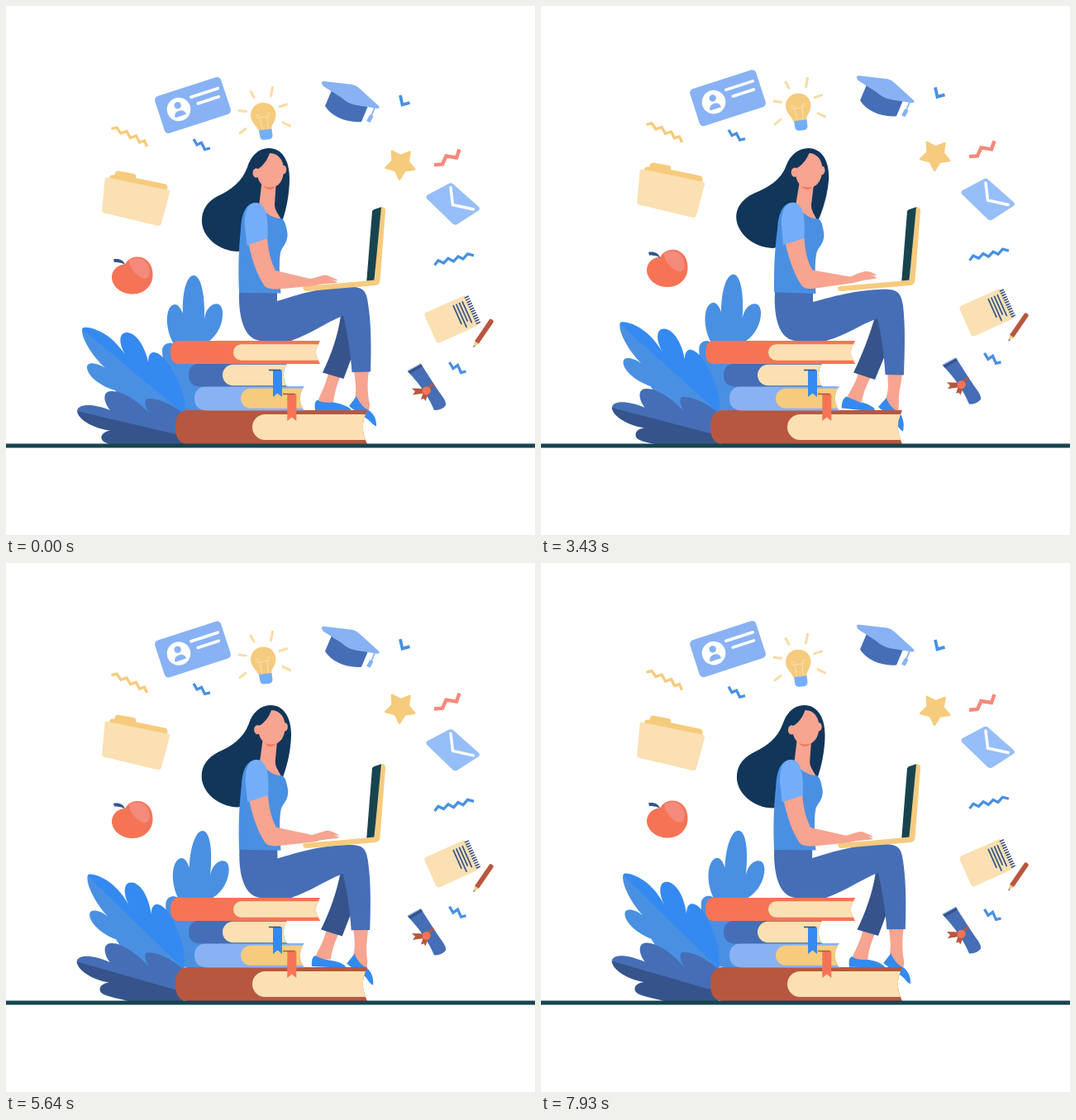
An HTML page with a canvas for the animation above (8 s loop, 640 by 640 pixels).

```html
<!DOCTYPE html>
<html lang="en">
<head>
<meta charset="utf-8">
<title>Learning online</title>
<style>
html, body { margin: 0; width: 100%; height: 100%; overflow: hidden; background: #fff; }
canvas { display: block; width: 100vw; height: 100vh; object-fit: contain; }
</style>
</head>
<body>
<canvas id="stage" width="640" height="640"></canvas>
<script>
const ctx = document.getElementById('stage').getContext('2d');
const LOOP = 8000;
const SWING = 7180;

const C = {
  blue: '#4a90e2', bright: '#348af0', denim: '#466eb6', navy: '#36548b',
  sky: '#88b2f4', sleeve: '#74aefa', mail: '#96bef8', hair: '#12365a',
  skin: '#f7a491', red: '#f67456', pink: '#f48a7c', brick: '#b8573f',
  gold: '#f6cb7d', cream: '#fae0b2', teal: '#17444f', white: '#fff'
};

const cache = new Map();
function path(d) {
  if (!cache.has(d)) cache.set(d, new Path2D(d));
  return cache.get(d);
}

function fill(color, d) {
  ctx.fillStyle = color;
  ctx.fill(typeof d === 'string' ? path(d) : d);
}

function line(color, width, d, cap = 'butt') {
  ctx.strokeStyle = color;
  ctx.lineWidth = width;
  ctx.lineCap = cap;
  ctx.lineJoin = 'miter';
  ctx.stroke(path(d));
}

function oval(color, x, y, rx, ry = rx) {
  ctx.fillStyle = color;
  ctx.beginPath();
  ctx.ellipse(x, y, rx, ry, 0, 0, Math.PI * 2);
  ctx.fill();
}

function box(color, x, y, w, h, r) {
  ctx.fillStyle = color;
  ctx.beginPath();
  ctx.roundRect(x, y, w, h, r);
  ctx.fill();
}

function turned(x, y, angle, draw) {
  ctx.save();
  ctx.translate(x, y);
  ctx.rotate(angle);
  draw();
  ctx.restore();
}

function pivot(x, y, angle, draw) {
  turned(x, y, angle, () => { ctx.translate(-x, -y); draw(); });
}

// Blend two path strings of the same structure.
function morph([a, b], k) {
  const to = b.match(/-?[\d.]+/g);
  let i = 0;
  return new Path2D(a.replace(/-?[\d.]+/g, n => +n + (to[i++] - n) * k));
}

/* ---------- floating things ---------- */

function card() {
  turned(226, 120, -Math.PI / 10, () => {
    box(C.sky, -42, -23.5, 84, 47, 5);
    oval(C.white, -17.7, -0.5, 14.3);
    oval(C.sky, -17.5, -5.5, 4.2);
    fill(C.sky, 'M-25 7.5C-25 -1 -11 -1 -11 7.5Q-11 8 -12 8H-24Q-25 8 -25 7.5Z');
    line(C.white, 3.6, 'M1 -10H35M6.5 0H33', 'round');
  });
}

function bulb() {
  line('#f9dca4', 3, 'M296 103.5L300 110.5M322.5 98.5L320.5 109M331 121.8L339.5 119M335 141L343.5 145M290 148.5L283 154M282 126.5L290.5 127.5', 'round');
  fill(C.gold, 'M311 117C302 117 296 124 296 132C296 141 303 144 305.5 151L321 149C321 143 326.5 140 326.5 131C326 123 320 117 311 117Z');
  fill(C.sleeve, 'M306 150.5L321.5 148.5L322.5 157Q322 161 318 161.3L312 162Q308.5 162 307.5 159Z');
  line(C.cream, 1, 'M310 149.5L307 136Q302 136 303 132Q306 130 307.5 135L316 134Q315 129 318.5 129Q321 132 316 134L317 148.5');
}

function cap() {
  fill(C.denim, 'M394 102L386 121C394 134 412 141.5 430 140L438 121L424 118L406 110Z');
  line(C.white, 3.5, 'M442.5 122.5L435.5 139');
  fill(C.sky, 'M384.5 91L419 95Q424 96 428 100L451 121Q453 124 449 124L424 120Q413 118 406 111L384 97Q379.5 91.5 384.5 91Z');
  line(C.sky, 1.8, 'M446 123L442 133');
  fill(C.sky, 'M440.5 131L444.5 133.5L440.5 141L436 139Z');
}

function star() {
  ctx.beginPath();
  for (let i = 0; i < 10; i++) {
    const a = 1.62 + i * Math.PI / 5, r = i % 2 ? 10 : 18.5;
    ctx.lineTo(477 + r * Math.cos(a), 191 + r * Math.sin(a));
  }
  ctx.closePath();
  ctx.fillStyle = ctx.strokeStyle = C.gold;
  ctx.lineWidth = 2.5;
  ctx.lineJoin = 'round';
  ctx.fill();
  ctx.stroke();
}

function envelope() {
  fill(C.mail, 'M510 228.5L535.5 215Q538.5 213.5 541 215.5L571.5 242.5Q574.5 245.5 571.5 247.5L546 264Q543 265.5 540.5 263.5L509.5 233.5Q507 230.5 510 228.5Z');
  line(C.white, 3.4, 'M538 219.5L540.5 240.5L565.5 246', 'round');
}

function notebook() {
  turned(539, 379, -0.42, () => {
    box(C.cream, -28, -20, 56, 40, 4);
    line(C.navy, 1.7, 'M8.7 -14.5V10.5M12.7 -14.5V16.5M16.7 -14.5V10.5M20.7 -14.5V14');
    for (let i = 0; i < 12; i++) line(C.navy, 1.6, `M25 ${-17 + i * 3.1}h5.5`);
  });
}

function pencil() {
  turned(565.3, 413, -0.97, () => {
    fill(C.gold, 'M0 0L8 -2.9V2.9Z');
    fill(C.navy, 'M0 0L2.5 -.9V.9Z');
    box(C.brick, 7.5, -2.9, 33, 5.8, [0, 2, 2, 0]);
  });
}

function diploma() {
  fill(C.denim, 'M486 442L502 433C512 448 519 460 527 471Q533 479 532 483Q528 489 518 489C511 472 501 458 486 442Z');
  fill(C.navy, 'M486 442L502 433L504 436L489 445Z');
  line(C.sky, 1.2, 'M486 441.5L502 432.8');
  line(C.brick, 3, 'M509 464L517 456.5');
  fill(C.brick, 'M506 463L491 462.5L495 466.5L492 470.5L506 468.5ZM505 467L502 476L505.5 475L507.5 478L511 468Z');
  oval(C.red, 508.7, 465.5, 5);
}

function apple() {
  fill(C.red, 'M146 313C136 311 127 320 128 330C130 342 142 349 154 348.5C168 348 178 338 177.5 324C177 310 168 303 158 303.5C151 304 146 308 144 313Z');
  fill(C.pink, 'M149 308C156 303 166 304 171 312C176 321 173 330 168 330C160 329 149 318 149 308Z');
  fill(C.navy, 'M130 306.5C136 305 142 307 144.5 313.5C139 309.5 134 310.5 131 310Z');
}

function folder() {
  fill(C.gold, 'M124 211L125.5 206Q126 204 131 204.5L132 202Q133 199 136 199.5L155 203Q158 204 157 208L193 215.5Q196.5 217 195 223Z');
  fill(C.cream, 'M122.5 207.5L195.5 222.5Q198.5 223 198 226L188 263Q187 266.5 183 265.8L119 250.5Q116 250 116.3 246L119.5 210Q120 207 122.5 207.5Z');
}

const zig = (color, width, d) => () => line(color, width, d);

// Each entry: time of the highest point, drawing.
const floaters = [
  [6900, card],
  [5850, bulb],
  [7450, cap],
  [6200, star],
  [7750, envelope],
  [7100, notebook],
  [7300, pencil],
  [7350, diploma],
  [6950, apple],
  [6500, folder],
  [7850, zig(C.gold, 3.3, 'M127.5 148.5L134 147L139 154L146 151.5L150.5 159.5L157.5 157L161.5 165L167.5 163L170.5 170')],
  [5700, zig(C.blue, 3.3, 'M227 161L231 168L236.5 165.5L240.5 173.5L247 172')],
  [6600, zig(C.blue, 3.8, 'M477 108L479.5 119.5L488.5 117')],
  [6400, zig(C.pink, 4.4, 'M518 192.3L528 191.5L532.5 181.5L545 183.5L548.5 173.5')],
  [7700, zig(C.blue, 3.3, 'M518.5 313.5L523 307.8L529.5 311L535 305.3L541.5 309L547 303L553 306L558.5 299.8L566 301.8')],
  [5850, zig(C.blue, 3.3, 'M536.5 431L541 438.5L546.5 434.5L550.5 443.5L556.5 442')]
];

function rise(t, peak) {
  const wave = x => Math.cos(Math.PI * x / SWING);
  return -8.4 * (wave(t - peak) - wave(peak));
}

/* ---------- plants and books ---------- */

function plants(k) {
  ctx.save();
  ctx.beginPath();
  ctx.rect(0, 0, 640, 530);
  ctx.clip();
  pivot(260, 472, 0.085 * k, () => {
    fill(C.blue, 'M227 326C219 326 213 345 214 372C211 364 207 361 204 361C197 362 194 372 195 384C196 394 199 402 203 409C198 406 190 408 189 416C189 440 205 470 216 492H250L255 415L245 406C256 398 263 384 262 370C261 361 256 359 251 361C244 364 241 371 240 379C241 350 236 326 227 326Z');
    fill(C.blue, 'M92 391C91 402 104 423 120 438C110 431 98 430 98 437C98 447 114 460 132 465L160 500H217V485L100 391Z');
    fill(C.bright, 'M92 391C93 386 108 390 118 396C130 403 138 413 145 423C136 409 136 395 146 395C157 395 170 412 174 440C170 426 173 418 180 419C190 421 199 435 208 453C214 466 217 478 217 495Z');
  });
  pivot(255, 478, 0.052 * k, () => {
    fill(C.navy, 'M86 490C87 500 105 511 126 513.5C117 515 113 521 117 526C122 531 138 532 155 536V540H217V515L100 487Z');
    fill(C.denim, 'M86 490C87 481 105 481 126 489C117 478 117 466 127 466C140 465 160 478 174 493C168 485 166 475 172 475C186 474 206 485 219 496V521L205 518Z');
  });
  ctx.restore();
}

function book(cover, pages, left, right, top, bottom, pageLeft, edge, r) {
  const mid = (top + bottom) / 2, y1 = top + edge, y2 = bottom - edge;
  const end = `L${right - 2} ${y1}Q${right - 8.5} ${mid} ${right - 2} ${y2}`;
  const half = (y2 - y1) / 2;
  fill(cover, `M${left + r} ${top}H${right}${end}L${right} ${bottom}H${left + r}Q${left} ${bottom - 1} ${left} ${mid}Q${left} ${top + 1} ${left + r} ${top}Z`);
  fill(pages, `M${pageLeft + half} ${y1}H${right - 2}${end}H${pageLeft + half}A${half} ${half} 0 0 1 ${pageLeft + half} ${y1}Z`);
}

function ribbon(color, bar, x, y, barColor) {
  fill(color, `M${x} ${y}h9.5q1.5 0 1.5 2v31l-5.5 -4.5l-5.5 4.5Z`);
  line(barColor, 1.6, `M${bar} ${y + 0.5}H${x + 9}`);
}

function books() {
  book(C.brick, C.cream, 205, 437, 489, 530, 298, 5, 14);
  book(C.sky, C.gold, 228, 361, 460, 489.5, 284, 2.8, 15);
  book(C.denim, C.cream, 221, 341, 432.5, 460.5, 262, 1.2, 13);
  book(C.red, C.cream, 199, 380, 405, 433, 275, 4.2, 9);
  ribbon(C.bright, 318, 323, 440, C.navy);
  ribbon(C.red, 335, 340.3, 469, C.brick);
}

/* ---------- the student ---------- */

// Pairs of poses: resting, leaning.
const pose = {
  backAnkle: [
    'M390 443L405 447C398 464 397 472 396 480L378 481C375 477 387 462 390 443Z',
    'M384 443L400 447C391 464 390 470 388 479L371 478C366 474 380 462 384 443Z'],
  backShoe: [
    'M376.5 476.5C372 480 374 486 374 489L418 489.5C416 485 406 481 396 479.5C388 480 381 480 376.5 476.5Z',
    'M369 472.5C364 476 364 482 363.5 486.5L401 490.5C405 490 404 487 401 485C395 481 390 480 385 479C377 478 372 476 369 472.5Z'],
  frontAnkle: [
    'M421 441L439 441C437 455 437 468 440 482L439 494C432 490 424 480 422.5 473C424 465 423 455 421 441Z',
    'M419 444L437 444C436 458 432 468 433 480L432 494C425 488 418 480 417 475C421 465 420 455 419 444Z'],
  frontShoe: [
    'M424 472L415 484C424 492 434 496 441 503C444 507 447 508 448 508.5C448.5 500 445 494 440 490C432 486 427 479 424 472Z',
    'M418 474L408 485C415 492 424 494 428 500C431 508 434 513 438 514.5C440 506 438 497 433 491C426 488 420 482 418 474Z'],
  backLeg: [
    'M405 374C402 397 394 421 383 443.5L408.5 451L420 420L412 374Z',
    'M404 376C397 400 389 421 378 443.5L404 452L418 418L412 376Z'],
  frontLeg: [
    'M282 346L328 346L328 357C345 352 375 341 410 340C430 339 436 342 438 360C442 385 442 415 441 442.5L418.5 443C417 420 413 395 408 374.5C385 384 370 396 345 405L308 405C292 404 281 385 282 346Z',
    'M283 346L329 346L329 358C346 354 375 344 410 343C430 342 435 345 438 362C441 390 440 415 439 446.5L416.5 446C415 420 412 400 407 378C385 386 370 398 345 405L308 405C292 404 281 385 283 346Z'],
  hair: [
    'M318 172C334 172 343 187 343 208C343 228 339 246 335 258L300 290L281 297C257 297 236 278 237 259C237 247 243 237 256 230C272 223 286 212 292 195C296 182 305 172 318 172Z',
    'M323.8 172C339.8 172.5 348.5 187 348.3 208C347 228 341 247 336 258L300 290L280 293C256 292 236 274 236.2 254.5C236.5 243 244 233 258 226.5C274 220 290 211 296.5 193.5C301 181 311 172 323.8 172Z'],
  arm: [
    'M293 286L316 280C317 297 321 310 326 320L368 330C375 329 381 326 386 325.5C391 326 398 330 401 331.5C401 333 396 331.5 390 330.5C394 331 400 333 401 334.5C398 336 385 335 372 338.5L330 342.5C320 343 314 342 311 336C302 322 297 304 293 286Z',
    'M295.5 286L318.5 280C319.5 296 322.5 310 328.5 319.5L374 327.5C381 325 388 321 394 321C399 321 403 324 406 325.5C406 327 400 326 396 325C400 326 405 327 406 329C402 331 390 331 378 335L332 341.5C323 343 317 342 314 336C304.5 321 299.5 304 295.5 286Z']
};

function feet(k) {
  fill(C.skin, morph(pose.backAnkle, k));
  fill(C.bright, morph(pose.backShoe, k));
  fill(C.skin, morph(pose.frontAnkle, k));
  fill(C.bright, morph(pose.frontShoe, k));
}

function laptop() {
  fill(C.gold, 'M451 246L453 243.5Q459.5 242 459 249L452.5 332Q452 337.3 447 338L364 345Q359.5 345 359 340.5Q360 339.3 363 339L437 332.5L446 331Z');
  fill(C.teal, 'M443 248.5Q443.5 247 445 246.3L454 243.2L445.5 331.5L436.3 332.5Z');
}

function student(k) {
  const lean = draw => pivot(310, 350, 0.025 * k, draw);
  const nod = draw => pivot(320, 276, 0.056 * k, draw);

  fill(C.navy, morph(pose.backLeg, k));
  fill(C.denim, morph(pose.frontLeg, k));

  fill(C.hair, morph(pose.hair, k));
  nod(() => fill(C.skin, 'M310 208L306 243L318 262L334 260C329 251 325 247 325 240L327 210Z'));
  lean(() => fill(C.blue, 'M302 238C290 239 285 250 284 270C281 300 281 320 282 347L332.5 347.5C331 330 330 310 332 299C334 290 341 288 340.5 275C339 266 337 258 333 257C322 257 312 250 307 240Z'));
  nod(() => {
    oval(C.red, 319, 209, 9.5, 13);
    oval(C.skin, 302.7, 202, 4.2, 5.7);
    oval(C.skin, 336, 198, 3.2, 5.2);
    fill(C.skin, 'M319 178C330 178 336 187 336 198C336 211 330 219.5 320 219.5C309 219.5 304 212 303 198C310 195 316 187 319 178Z');
  });

  laptop();
  fill(C.skin, morph(pose.arm, k));
  lean(() => fill(C.sleeve, 'M302 238C292 238 288 250 289 266L291.5 289.5L316.5 281C317.5 265 316 250 312 244C309 239 305 238 302 238Z'));
}

function render(t) {
  ctx.fillStyle = C.white;
  ctx.fillRect(0, 0, 640, 640);

  for (const [peak, draw] of floaters) {
    ctx.save();
    ctx.translate(0, rise(t, peak));
    draw();
    ctx.restore();
  }

  const sway = (1 - Math.cos(Math.PI * t / SWING)) / 2;
  const bend = (1 - Math.cos(2 * Math.PI * t / SWING)) / 2;
  plants(sway);
  feet(bend);
  books();
  ctx.fillStyle = C.teal;
  ctx.fillRect(0, 529.5, 640, 5);
  student(bend);
}

const start = performance.now();
function tick() {
  render((performance.now() - start) % LOOP);
  requestAnimationFrame(tick);
}
tick();
</script>
</body>
</html>
```
